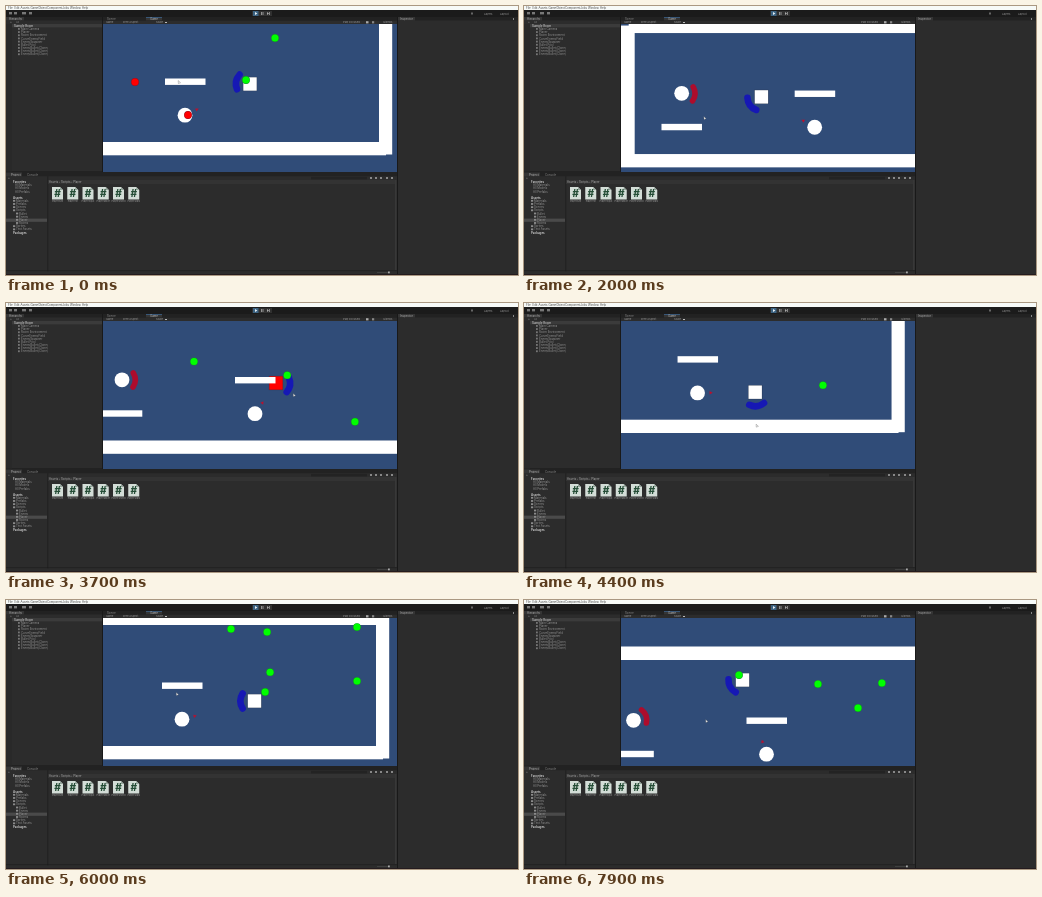
Recreate the animation shown at these times as an HTML page with a canvas. Size 512 px wide and 269 px high, loop 8000 ms.

```html
<!DOCTYPE html>
<html lang="en">
<head>
<meta charset="utf-8">
<title>Arena in the editor</title>
<style>
  html, body { margin: 0; width: 100%; height: 100%; overflow: hidden; background: #191919; }
  svg, canvas { position: absolute; display: block; }
  svg { left: 0; top: 0; width: 512px; height: 269px; }
  canvas { left: 97px; top: 18px; width: 294px; height: 147.5px; }
  text { font-family: Inter, "Open Sans", sans-serif; }
</style>
</head>
<body>
<svg id="ui" viewBox="0 0 512 269"></svg>
<canvas id="game"></canvas>
<script>
// ---------- Editor panels ----------
const ui = document.getElementById('ui');

function add(tag, attrs, content) {
  const el = document.createElementNS('http://www.w3.org/2000/svg', tag);
  for (const name in attrs) el.setAttribute(name, attrs[name]);
  if (content) el.textContent = content;
  ui.append(el);
}
const box = (x, y, width, height, fill) => add('rect', { x, y, width, height, fill });
const label = (x, y, text, fill = '#929292', size = 2.9, weight = 400) =>
  add('text', { x, y, fill, 'font-size': size, 'font-weight': weight }, text);

function buildEditor() {
  const panel = '#2c2c2c', tab = '#353535', dark = '#1b1b1b';

  // Menu and toolbar
  box(0, 0, 512, 4, '#f7faf8');
  [[2, 'File'], [8.5, 'Edit'], [14.5, 'Assets'], [24.5, 'GameObject'], [41, 'Component'],
   [56.5, 'Jobs'], [64, 'Window'], [76, 'Help']].forEach(([x, s]) => label(x, 3.1, s, '#444', 2.8));
  box(0, 4, 512, 7, dark);
  [[3, 3], [8, 3], [16, 4], [23, 3]].forEach(([x, w]) => box(x, 6, w, 2.4, '#777'));
  box(246, 5, 20, 5, '#303030');
  box(247, 5, 5.5, 5, '#3c6382');
  add('path', { d: 'M249 6l2.4 1.5-2.4 1.5z', fill: '#e4edf2' });
  box(255, 6, .8, 3, '#aaa');
  box(256.6, 6, .8, 3, '#aaa');
  add('path', { d: 'M261 6l2 1.5-2 1.5zM263.3 6h.7v3h-.7z', fill: '#aaa' });
  box(465, 6.5, 2, 2, '#666');
  label(478, 8.5, 'Layers', '#999', 2.7);
  label(494, 8.5, 'Layout', '#999', 2.7);

  // Hierarchy
  box(0, 11, 96, 154.5, panel);
  box(0, 11, 96, 3.5, '#222');
  box(0, 11, 18, 3.5, tab);
  label(3, 13.8, 'Hierarchy', '#aaa');
  label(4, 17.3, '+', '#aaa');
  label(10, 17.3, 'All', '#888', 2.6);
  box(0, 18, 96, 3.4, '#3b3b3b');
  label(8, 20.8, 'Sample Room', '#bbb', 2.9, 600);
  ['Main Camera', 'Player', 'Room Environment', 'CurveEnemyField', 'EnemySpawner',
   'Bullet Pool', 'EnemyBullet(Clone)', 'EnemyBullet(Clone)', 'EnemyBullet(Clone)'
  ].forEach((s, i) => {
    const y = 24 + i * 3.17;
    box(12, y - 2, 1.8, 1.8, '#777');
    label(15, y, s);
  });
  box(0, 18, 6, 147.5, '#292929');

  // Game view header
  box(97, 11, 294, 3.5, '#222');
  label(101, 13.8, 'Scene', '#888');
  box(140, 11, 16, 3.5, tab);
  box(140, 11, 16, .5, '#3a79bb');
  label(144, 13.9, 'Game', '#bbb');
  box(97, 14.5, 294, 3.5, panel);
  [[100, 'Game'], [117, 'Free Aspect'], [150, 'Scale'], [337, 'Play Focused'], [377, 'Gizmos']]
    .forEach(([x, s]) => label(x, 17.3, s, '#999', 2.7));
  box(159, 16, 2, 1, '#bbb');
  box(360, 15.2, 2.5, 2.2, '#aaa');
  box(366, 15.2, 2.2, 2.2, '#888');

  // Inspector
  box(392, 11, 120, 258, panel);
  box(392, 11, 120, 3.5, '#222');
  box(392, 11, 17, 3.5, tab);
  label(394, 13.8, 'Inspector', '#aaa');
  box(507, 12, 1, 2, '#888');

  // Project
  box(0, 166.5, 391, 102.5, panel);
  box(0, 166.5, 391, 3.8, '#222');
  box(0, 166.5, 16, 3.8, tab);
  label(5, 169.5, 'Project', '#bbb');
  label(21, 169.5, 'Console', '#888');
  label(2, 173.2, '+', '#aaa');
  box(305, 170.8, 56, 2.6, '#232323');
  [364, 369, 374, 380, 385].forEach(x => box(x, 171, 2, 2, '#888'));
  box(41.5, 170.3, .7, 95, dark);
  box(42, 174, 347, 4, '#333');
  label(43, 177.2, 'Assets › Scripts › Player', '#aaa');
  label(7, 177, 'Favorites', '#ccc', 2.9, 700);
  ['All Materials', 'All Models', 'All Prefabs'].forEach((s, i) => label(9, 180.2 + i * 3.15, s));
  box(0, 212.6, 41, 3.2, '#4a4a4a');
  label(7, 192.7, 'Assets', '#ccc', 2.9, 700);
  ['Materials', 'Prefabs', 'Scenes', 'Scripts', 'Bullet', 'Enemy', 'Player', 'Rooms', 'Sprites', 'Text Assets']
    .forEach((s, i) => {
      const x = i > 3 && i < 8 ? 13 : 10, y = 195.9 + i * 3.17;
      box(x - 3, y - 2, 2.2, 1.8, '#8b8b8b');
      label(x, y, s);
    });
  label(7, 228.2, 'Packages', '#ccc', 2.9, 700);

  ['PlayerAim', 'PlayerHit', 'PlayerInput', 'PlayerMove', 'PlayerShield', 'PlayerStats'].forEach((s, i) => {
    const x = 46 + i * 15.25;
    add('path', { d: `M${x} 181h8l3 3v9.5h-11z`, fill: '#d3ddd7' });
    add('path', { d: `M${x + 8} 181v3h3z`, fill: '#94a49b' });
    add('text', { x: x + 5.5, y: 190.9, fill: '#244d36', 'font-size': 10, 'font-weight': 800, 'text-anchor': 'middle' }, '#');
    add('text', { x: x + 5.5, y: 196.3, fill: '#999', 'font-size': 2.4, 'text-anchor': 'middle' }, s);
  });
  box(389, 174, 1.5, 90, '#383838');
  box(0, 264.5, 391, .6, dark);
  box(371, 266.2, 12, .5, '#555');
  box(382, 265.5, 1.8, 1.8, '#aaa');
  box(0, 268, 512, 1, '#241b1e');
}
buildEditor();

// ---------- Game view ----------
const LOOP = 8000, STEP = 100;

// time, camera x y, player x y (world), cursor x y (screen), shield angle
const keys = [
  [0, 0, 0, 244, 78, 173, 76, 190],
  [1300, 36, -19, 182.5, 91, 150, 102, 171],
  [2800, 185, 50, 81, 64, 240, 118, 95],
  [3700, 70, 1.5, 200, 78.5, 288, 92, 8],
  [4500, -12, -22, 240, 112, 225, 124, 95],
  [5100, -35, -37.5, 254, 126.5, 189, 120, 160],
  [6000, -3, 10, 251.5, 91, 171, 94, 180],
  [7900, 63.5, 45, 155, 35, 182.5, 121, 151]
];

// Balls fly straight and bounce off the walls: start, x, y, speed x y per second, life
const greens = [
  [0, 269, 32, 53, -41, 1900],
  [0, 240, 74, 17, -93, 1900],
  [700, 192, 80, 127, -30, 1400],
  [2100, 120, 20, 57, 31.7, 1800],
  [2700, 53.6, 77, 64.4, -20, 1600],
  [3400, 268, 124, 36.4, -22.5, 1700],
  [5100, 330, 85.5, 26.7, -16, 1400],
  [4700, 232.7, 78.4, 93.3, -47.2, 1400],
  [4600, 254.7, 104, 6.7, -58.5, 1500],
  [4900, 257.3, 110, -26.7, -82.8, 1100],
  [6000, 228, 19, 1.3, -112.6, 2000],
  [5400, 266, 91, 1.8, -48, 2600],
  [5700, 257, 95.6, 17, -45.3, 2300],
  [7600, 132, 46, 65, -53, 400]
];
const reds = [
  [0, 129, 76, 90, 6, 700],
  [0, 182, 109, 66, -42, 500],
  [900, 58, 67, 57, -37, 1000],
  [1000, 59, 74.5, 73, -5, 800],
  [3000, 59, 75, 218, 5, 600],
  [6900, 58, 70, 106, -34, 700]
];

const canvas = document.getElementById('game');
const g = canvas.getContext('2d');
const ratio = window.devicePixelRatio || 1;
canvas.width = Math.round(294 * ratio);
canvas.height = Math.round(147.5 * ratio);

// Monotone cubic through one column of the keys
function slope(i, col) {
  if (i < 1 || i > keys.length - 2) return 0;
  const rate = k => (keys[k + 1][col] - keys[k][col]) / (keys[k + 1][0] - keys[k][0]);
  const a = rate(i - 1), b = rate(i);
  return a * b > 0 ? 2 * a * b / (a + b) : 0;
}
function pose(t, col) {
  const last = keys.length - 1;
  if (t >= keys[last][0]) return keys[last][col];
  const i = keys.findIndex((k, n) => t < keys[n + 1][0]);
  const h = keys[i + 1][0] - keys[i][0], u = (t - keys[i][0]) / h, v = 1 - u;
  return keys[i][col] * (1 + 2 * u) * v * v + slope(i, col) * h * u * v * v
    + keys[i + 1][col] * u * u * (3 - 2 * u) - slope(i + 1, col) * h * u * u * v;
}

function rect(x, y, w, h, fill) {
  g.fillStyle = fill;
  g.fillRect(x, y, w, h);
}
function disc(x, y, r, fill) {
  g.fillStyle = fill;
  g.beginPath();
  g.arc(x, y, r, 0, 7);
  g.fill();
}
function shield(x, y, r, angle, width, color) {
  g.strokeStyle = color;
  g.lineWidth = width;
  g.lineCap = 'round';
  g.beginPath();
  g.arc(x, y, r, angle - .56, angle + .56);
  g.stroke();
}
function bounce(v, min, max) {
  const span = max - min, d = (((v - min) % (2 * span)) + 2 * span) % (2 * span);
  return min + (d > span ? 2 * span - d : d);
}
function balls(list, t, fill, edge) {
  for (const [from, x0, y0, vx, vy, life] of list) {
    const age = t - from;
    if (age < 0 || age >= life) continue;
    const x = bounce(x0 + vx * age / 1000, 1, 371);
    const y = bounce(y0 + vy * age / 1000, 17, 134);
    disc(x, y, 3.9, edge);
    disc(x, y, 3.5, fill);
  }
}

function draw(t) {
  const [cx, cy, px, py, mx, my, aim] = [1, 2, 3, 4, 5, 6, 7].map(col => pose(t, col));
  g.setTransform(ratio, 0, 0, ratio, -97 * ratio, -18 * ratio);
  rect(97, 18, 294, 148, '#304c78');
  g.save();
  g.translate(cx, cy);

  // Player
  shield(px, py, 14, aim * Math.PI / 180, 6.6, '#1618b4');
  rect(px - 7.1, py - 7.1, 14.2, 14.2, '#26364f');
  rect(px - 6.7, py - 6.7, 13.4, 13.4, t >= 3600 && t < 3900 ? '#f00' : '#fff');

  // Room
  rect(-7, 1.5, 393, 13.5, '#fff');
  rect(-15, 7.5, 14, 141, '#fff');
  rect(-15, 136, 395, 13.3, '#fff');
  rect(373, 1.5, 13.2, 147, '#fff');
  rect(159, 72.5, 40.5, 6.4, '#fff');
  rect(25.8, 105.8, 40.5, 6.4, '#fff');

  // Turrets face the player
  disc(46, 75.3, 7.4, '#fff');
  shield(46, 75.3, 13.2, Math.atan2(py - 75.3, px - 46), 5.6, '#ad0c2c');
  disc(179, 109.2, 7.4, '#fff');
  g.save();
  g.translate(179, 109.2);
  g.rotate(Math.atan2(py - 109.2, px - 179));
  g.fillStyle = '#b51231';
  g.beginPath();
  g.moveTo(12, -1.7);
  g.lineTo(15.2, 0);
  g.lineTo(12, 1.7);
  g.fill();
  g.restore();

  balls(reds, t, '#f00', '#8c1024');
  balls(greens, t, '#0f0', '#148a2c');
  g.restore();

  // Cursor
  g.beginPath();
  g.moveTo(mx - .8, my - 1.4);
  g.lineTo(mx + 1.5, my + .7);
  g.lineTo(mx - .6, my + 1.5);
  g.closePath();
  g.fillStyle = '#fff';
  g.fill();
  g.lineWidth = .35;
  g.strokeStyle = '#555';
  g.stroke();
}

const start = performance.now();
function tick() {
  const t = (performance.now() - start) % LOOP;
  draw(Math.floor(t / STEP) * STEP);
  requestAnimationFrame(tick);
}
tick();
</script>
</body>
</html>
```
